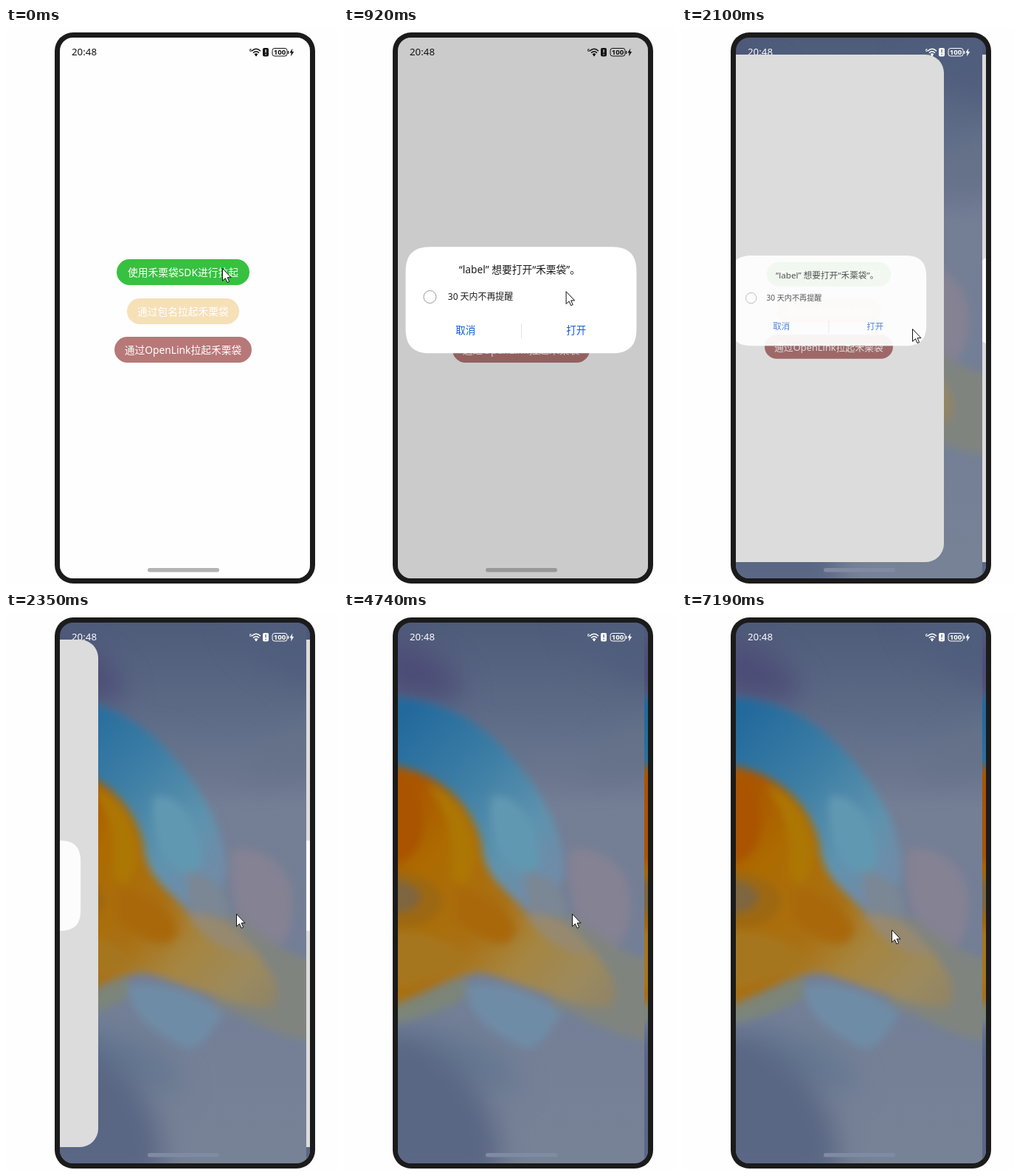
Write an HTML page that moves like this. It is 450 px wide and 754 px high and loops after 8 s.

```html
<!DOCTYPE html>
<html lang="zh">
<head>
<meta charset="utf-8">
<title>App launch</title>
<style>
html, body { margin: 0; width: 100%; height: 100%; overflow: hidden; background: #fefefe; }
svg { display: block; width: 450px; height: 754px; }
text { font-family: "Noto Sans", "Noto Sans CJK SC", "Noto Sans CJK", sans-serif; font-weight: 500; }
.mid { text-anchor: middle; }
.soft { filter: url(#soft); }
.wide { filter: url(#wide); }
</style>
</head>
<body>
<svg viewBox="0 0 450 754" xmlns="http://www.w3.org/2000/svg">
<defs>
  <clipPath id="glass"><rect x="73" y="13" width="339" height="732" rx="18"/></clipPath>
  <clipPath id="edge"><rect x="407" y="13" width="5" height="732"/></clipPath>
  <filter id="soft" x="-30%" y="-30%" width="160%" height="160%" color-interpolation-filters="sRGB"><feGaussianBlur stdDeviation="6"/></filter>
  <filter id="wide" x="-50%" y="-50%" width="200%" height="200%" color-interpolation-filters="sRGB"><feGaussianBlur stdDeviation="18"/></filter>
  <linearGradient id="sky" x1="0" y1="0" x2="0" y2="1">
    <stop offset="0" stop-color="#4e5b79"/><stop offset=".18" stop-color="#5f6c88"/>
    <stop offset=".34" stop-color="#747e95"/><stop offset=".7" stop-color="#737f97"/>
    <stop offset="1" stop-color="#788296"/>
  </linearGradient>
  <linearGradient id="blue" gradientUnits="userSpaceOnUse" x1="73" y1="140" x2="275" y2="350">
    <stop offset="0" stop-color="#22699c"/><stop offset=".4" stop-color="#3a7ca4"/>
    <stop offset=".8" stop-color="#5e93ae"/><stop offset="1" stop-color="#6f8ca8"/>
  </linearGradient>
  <linearGradient id="amber" gradientUnits="userSpaceOnUse" x1="73" y1="260" x2="370" y2="530">
    <stop offset="0" stop-color="#aa5600"/><stop offset=".2" stop-color="#ad6b00"/>
    <stop offset=".48" stop-color="#a97013"/><stop offset=".65" stop-color="#a6853f"/>
    <stop offset=".85" stop-color="#9c8a5e"/><stop offset="1" stop-color="#8d8368"/>
  </linearGradient>

  <g id="buttons" fill="#fff" font-size="13.75" class="mid">
    <rect x="150" y="313" width="180" height="35" rx="17.5" fill="#36c140"/>
    <rect x="164" y="366" width="152" height="35" rx="17.5" fill="#f5e0b7"/>
    <rect x="147" y="418" width="186" height="35" rx="17.5" fill="#b77878"/>
    <text x="240" y="336">使用禾栗袋SDK进行拉起</text>
    <text x="240" y="388.5">通过包名拉起禾栗袋</text>
    <text x="240" y="441">通过OpenLink拉起禾栗袋</text>
  </g>

  <g id="dialog">
    <path d="M117 296H363C387 296 397 307 397 330V407C397 430 387 440.500 363 440.500H117C93 440.500 83 430 83 407V330C83 307 93 296 117 296Z" fill="#fff"/>
    <g id="label" fill="#1b1b1b">
      <text y="332" font-size="13.8"><tspan x="155.500">“label”</tspan><tspan x="200">想要打开“禾栗袋”。</tspan></text>
      <circle cx="116" cy="364" r="8.500" fill="none" stroke="#8f8f8f" stroke-width=".9"/>
      <text x="140.500" y="368.300" font-size="12">30 天内不再提醒</text>
      <path d="M240.500 400V420" stroke="#e2e2e2"/>
      <g class="mid" fill="#125bd3" font-size="13.6">
        <text x="164.500" y="414">取消</text>
        <text x="315" y="414">打开</text>
      </g>
    </g>
  </g>
</defs>

<rect x="66" y="6" width="353" height="746" rx="25" fill="#1b1b1b"/>
<g clip-path="url(#glass)">
  <g id="screen">
    <g id="wall">
      <rect x="60" y="13" width="352" height="732" fill="url(#sky)"/>
      <g class="wide">
        <path d="M50 35C110 40 150 70 165 110C120 125 90 110 50 110Z" fill="#4c4c76"/>
        <path d="M300 0H430V100C370 90 320 60 300 0Z" fill="#505e7d"/>
        <path d="M190 160C260 180 290 235 330 205C370 170 390 150 430 140V210C350 230 280 240 190 160Z" fill="#657288"/>
        <path d="M40 565C130 560 180 640 205 690L215 770H40Z" fill="#596684"/>
        <path d="M90 555C170 570 230 590 240 650C200 650 130 610 90 555Z" fill="#647690"/>
      </g>
      <g class="soft">
        <path d="M306 320C340 312 385 335 389 385C390 430 380 460 350 450C310 430 300 370 306 320Z" fill="#848293"/>
        <path d="M285 405C335 410 350 460 425 470V580C370 578 330 548 280 530Z" fill="#80847f"/>
        <path d="M165 505C215 495 270 520 296 542C280 560 270 590 245 590C210 570 170 555 165 505Z" fill="#6f8ca6"/>
        <path d="M40 115C110 108 165 135 205 172C255 220 300 290 298 350C296 385 265 400 240 400L190 360L150 250L40 225Z" fill="url(#blue)"/>
        <path d="M200 248C235 240 262 290 266 335C258 358 235 360 215 330C202 305 195 275 200 248Z" fill="#6198b1"/>
        <path d="M245 350C285 355 305 380 300 412L250 410Z" fill="#7b8794"/>
        <path d="M40 520C90 530 110 515 165 492V520C130 540 100 550 40 562Z" fill="#7c8578"/>
        <path d="M40 204C115 206 168 245 186 310C190 365 225 375 252 412C300 415 330 440 350 475C368 495 372 520 360 535C310 535 240 500 190 487C155 485 125 512 40 540Z" fill="url(#amber)"/>
        <path d="M245 408C290 402 322 430 338 465C300 460 268 445 245 408Z" fill="#97896f"/>
        <path d="M40 218C85 215 108 250 107 285C105 320 92 340 40 345Z" fill="#aa5300"/>
        <path d="M112 232C150 245 172 275 178 330C170 370 155 380 145 350C150 300 140 270 112 232Z" fill="#ad7704"/>
        <path d="M40 345C105 348 138 370 134 395C122 425 85 430 40 425Z" fill="#9d6812"/>
        <path d="M55 362C85 358 106 375 104 388C96 405 75 408 55 406Z" fill="#7e6640"/>
        <path d="M40 430C100 425 140 440 175 470C145 485 110 500 40 515Z" fill="#a6761f"/>
        <path d="M150 370C185 375 225 395 234 430C225 460 190 450 150 415Z" fill="#a9690b"/>
      </g>
    </g>
    <g id="app">
      <rect x="60" y="13" width="352" height="732" fill="#fefefe"/>
      <use href="#buttons"/>
      <rect id="scrim" x="60" y="13" width="352" height="732" opacity=".2"/>
    </g>
    <g id="status" fill="currentColor">
      <text x="89" y="37" font-size="13.3">20:48</text>
      <text x="330" y="31.500" font-size="5" style="font-weight:700">6</text>
      <path d="M333 31.200Q339 25.300 345 31.200M335 33.700Q339 29.800 343 33.700M337 36Q339 34.200 341 36" fill="none" stroke="currentColor" stroke-width="1.500"/>
      <circle cx="339" cy="37" r="1.200"/>
      <path fill-rule="evenodd" d="M350 27H354Q356 27 356 29V36.500Q356 38.500 354 38.500H350Q348 38.500 348 36.500V29Q348 27 350 27ZM351.400 29V33.500H352.700V29ZM351.400 35V36.500H352.700V35Z"/>
      <rect x="361" y="27.500" width="20" height="10.500" rx="3" fill="none" stroke="currentColor"/>
      <text x="371" y="36.300" font-size="9.6" class="mid" style="font-weight:700">100</text>
      <rect x="382" y="31" width="1.200" height="4"/>
      <path d="M388.500 27.500L384.300 33.500H386.700L386 38.500L390.200 32H387.600Z"/>
    </g>
    <g id="card">
      <rect x="37" y="36" width="318" height="687" rx="25" fill="#fff"/>
      <use href="#buttons" transform="translate(-25.400 24.300) scale(.935)"/>
      <rect x="37" y="36" width="318" height="687" rx="25" opacity=".137"/>
    </g>
    <use id="popup" href="#dialog"/>
  </g>
  <g clip-path="url(#edge)"><use href="#screen" transform="translate(334)"/></g>
  <rect id="bar" x="192" y="731" width="97" height="5.500" rx="2.750"/>
</g>
<path id="cursor" d="M.5 .5V17.300L4.400 13.700L7 19.500L9.600 18.400L7.100 12.700H12Z" fill="#fff" stroke="#111" stroke-width="1" stroke-linejoin="round"/>
</svg>
<script>
const LOOP = 8000, TICK = 120;
const $ = id => document.getElementById(id);
const attr = (id, name, value) => $(id).setAttribute(name, value);
const show = (id, on) => attr(id, "display", on ? "inline" : "none");

// Pointer moves: start time, number of ticks, end point
const moves = [
  [800, 5, 312, 403], [1420, 1, 312, 407],
  [4740, 1, 309, 407], [4860, 4, 297, 416.5], [5370, 1, 296, 417.5],
  [5750, 2, 293, 419], [6140, 4, 292, 424.5],
  [6810, 3, 284.5, 427.5], [7190, 1, 284, 428.5]
];

function pointer(t) {
  let x = 293, y = 325;
  for (const [start, n, tx, ty] of moves) {
    if (t < start) break;
    const k = Math.min(n, Math.floor((t - start) / TICK) + 1) / n;
    x += (tx - x) * k;
    y += (ty - y) * k;
  }
  return [x, y];
}

function draw(t) {
  const inApp = t < 2100, leaving = !inApp && t < 2470;
  const dx = t < 2350 ? 0 : -230;
  show("app", inApp);
  show("scrim", t >= 530);
  show("card", leaving);
  show("popup", t >= 530 && t < 2470);
  attr("card", "transform", `translate(${dx})`);
  attr("popup", "transform", leaving ? `translate(${dx - 4.3} 58) scale(.845)`
    : t < 800 ? "" : "translate(.84 1.3) scale(.9965)");
  attr("popup", "opacity", leaving ? .93 : 1);
  attr("label", "opacity", leaving ? .78 : 1);
  $("status").style.color = inApp ? "#111" : "#fff";
  attr("bar", "fill", t < 530 ? "#b2b2b2" : inApp ? "#989898" : "#808aa2");
  attr("cursor", "transform", `translate(${pointer(t)})`);
}

function loop() {
  draw(performance.now() % LOOP);
  requestAnimationFrame(loop);
}
loop();
</script>
</body>
</html>
```
